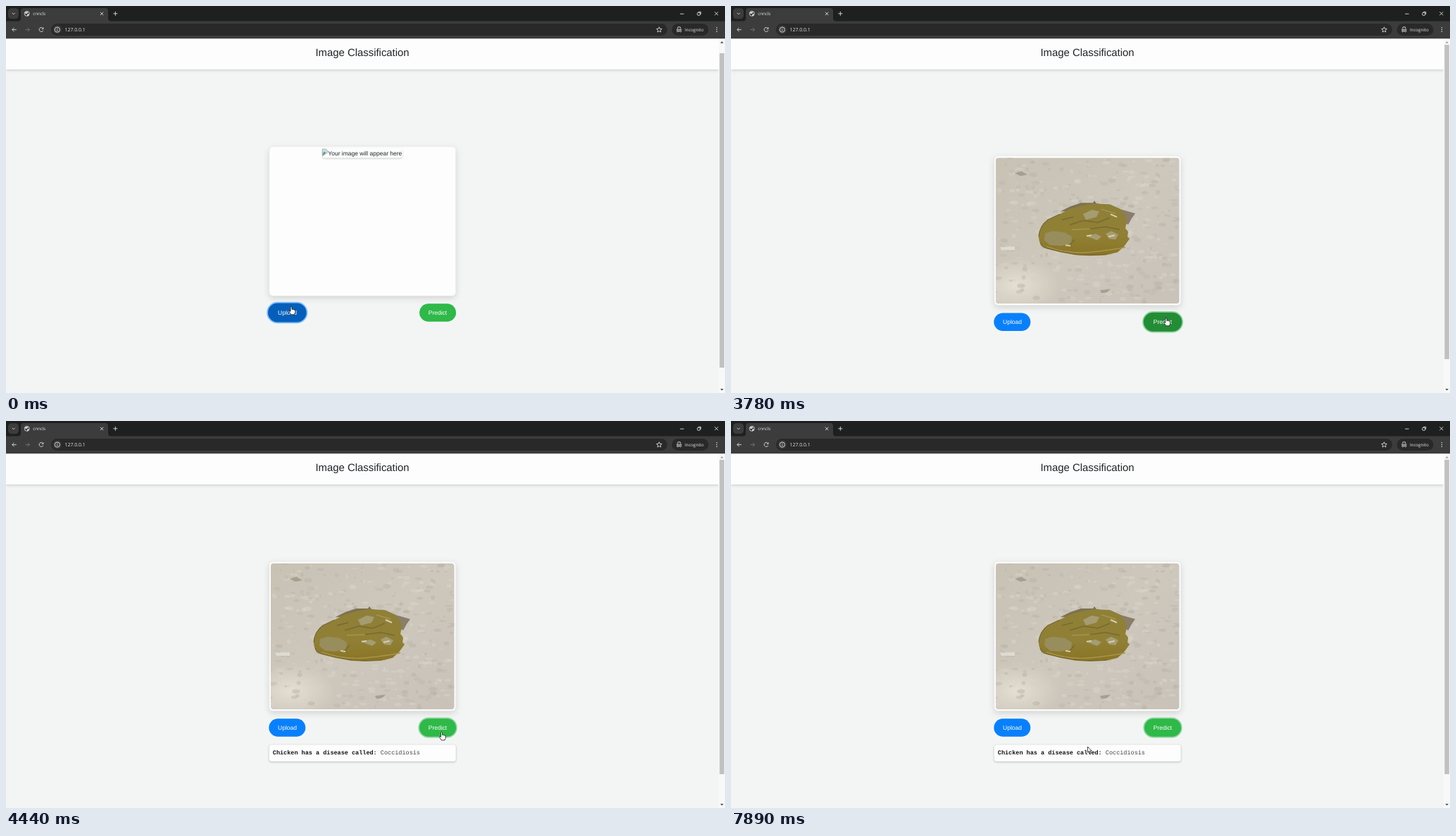
These frames come from a looping animation (1021x549 px, 8000 ms). An HTML page:

```html
<!DOCTYPE html>
<html lang="en">
<head>
<meta charset="utf-8">
<title>Image Classification</title>
<style>
  html, body { margin: 0; width: 100%; height: 100%; overflow: hidden; background: #f3f5f5; }
  svg { display: block; width: 1021px; height: 549px; }
  text { white-space: pre; text-rendering: geometricPrecision; }
  .page { font: 8.51px "Liberation Sans", Arial, sans-serif; fill: #212529; }
  .chrome { font: 6.2px "Open Sans", "Noto Sans", sans-serif; fill: #e8e8e8; }
  .mono { font: 8.51px "Liberation Mono", "Courier New", monospace; fill: #444; }
  .line { fill: none; stroke: #dedede; stroke-width: .9; }
  .mid { text-anchor: middle; }
  #bar { filter: drop-shadow(0 1px 2px rgba(0,0,0,.18)); }
  #card { filter: drop-shadow(0 3px 4px rgba(0,0,0,.13)); }
  #card.raised { filter: drop-shadow(0 5px 7px rgba(0,0,0,.25)); }
  #result rect, #alt rect { filter: drop-shadow(0 1px 1px rgba(0,0,0,.2)); }
  .button rect { transform-box: fill-box; transform-origin: center; paint-order: stroke; }
  .button text { fill: #fff; text-anchor: middle; }
  .soft { filter: blur(.7px); }
</style>
</head>
<body>
<svg viewBox="0 0 1021 549" xmlns="http://www.w3.org/2000/svg">
  <defs>
    <clipPath id="frame"><rect x="376" y="202" width="260.5" height="207" rx="4"/></clipPath>
    <linearGradient id="ground" x1="0" y1="0" x2="1" y2="1">
      <stop offset="0" stop-color="#c8c2b5"/><stop offset=".5" stop-color="#cdc7bc"/><stop offset="1" stop-color="#c8c2b9"/>
    </linearGradient>
    <radialGradient id="shine">
      <stop offset="0" stop-color="#e4dfd2"/><stop offset="1" stop-color="#e4dfd2" stop-opacity="0"/>
    </radialGradient>
    <linearGradient id="olive" x1="0" y1="0" x2="0" y2="1">
      <stop offset="0" stop-color="#8f8038"/><stop offset=".6" stop-color="#908035"/><stop offset="1" stop-color="#8a7425"/>
    </linearGradient>
  </defs>

  <rect width="1021" height="549" fill="#f3f5f5"/>
  <rect id="bar" y="40" width="1012" height="50" fill="#fdfdfd"/>
  <text class="page mid" x="506" y="70.8" style="font-size:14.9px">Image Classification</text>

  <g id="content">
    <rect id="card" x="373.8" y="199.3" width="265" height="212" rx="5.5" fill="#fdfdfd" stroke="#e2e2de" stroke-width=".6"/>
    <g id="alt">
      <rect x="449" y="202" width="114" height="13.5" rx="3" fill="#fdfdfd"/>
      <path d="M449.5 203h5l2 2v3l-7 5z" fill="#c9dcf2" stroke="#8a9199" stroke-width=".6"/>
      <path d="M449.8 212v-3l2.5-2.5 2 1.8z" fill="#58a55c"/>
      <text class="page" x="457.3" y="211.8">Your image will appear here</text>
    </g>
    <g id="photo" clip-path="url(#frame)">
      <rect x="376" y="202" width="261" height="207" fill="url(#ground)"/>
      <ellipse cx="405" cy="383" rx="62" ry="38" fill="url(#shine)"/>
      <g id="specks" class="soft"></g>
      <g class="soft">
        <path d="M403 224l9-3 9 5-10 2zM524 390l15-2-5 5-8 1z" fill="#a69f90"/>
        <path d="M382 329l21-1v5h-19z" fill="#dedbd3"/>
        <path d="M538 268l15 7 21 6-5 7-5 9-12-7z" fill="#8a7d69"/>
        <path d="M468 278l14-7 15-5 17 0 2-3 3 4 12 2-30 9z" fill="#7d7250"/>
        <path d="M437 314q1-15 13-24l17-8 13-7 18-5 17-3 22 1 16 7 7 9 2 9-2 9 4 5-1 7 3 3-8 11-9 8-16 4-23 1-20-1-22-4-20-5q-11-5-11-16z" fill="url(#olive)"/>
        <path d="M446 309l11-3 17 2 10 6-1 10-15 3-15-1-8-7z" fill="#988d5c"/>
        <path d="M500 282l12-6 11 2-4 8-15 4zM504 313l14-3 8 4-6 5zM532 310l8-4 10 5-4 7-9-1z" fill="#a59c72"/>
        <path d="M481 297l20-6 20 3 17-7M470 290l16-4M508 303l24-3 20 4M488 318l-8 9" fill="none" stroke="#776a30" stroke-width="1.6"/>
        <path d="M505 313l7-1M536 314l9-2M475 326l7 1M539 282l9 4" fill="none" stroke="#d5ceb0" stroke-width="2"/>
        <path d="M448 328q32 11 62 8t50-7M484 304l26-1M526 275l20 6" fill="none" stroke="#a8944a" stroke-width="1.4"/>
        <path d="M437 314q1-15 13-24l17-8M439 322q2 7 9 8l20 5 22 4 20 1 23-1" fill="none" stroke="#75672e" stroke-width="1.2"/>
      </g>
    </g>
    <g class="button" id="upload">
      <rect x="373.3" y="422.2" width="52" height="25.6" rx="12.8" stroke="#80bdff"/>
      <text class="page" x="399.5" y="437.7">Upload</text>
    </g>
    <g class="button" id="predict">
      <rect x="587.1" y="422.2" width="52" height="25.6" rx="12.8" stroke="#92d6a0"/>
      <text class="page" x="613" y="437.7">Predict</text>
    </g>
    <g id="result">
      <rect x="373.5" y="459" width="265.5" height="24" rx="3.5" fill="#fdfdfd" stroke="#e0e0dc" stroke-width=".6"/>
      <text class="mono" x="378.8" y="473"><tspan font-weight="bold" fill="#161616">Chicken has a disease called: </tspan>Coccidiosis</text>
    </g>
  </g>

  <g id="overlay">
    <rect y="46" width="1012" height="503" fill="#000" opacity=".5"/>
    <circle cx="506.2" cy="297.7" r="27.7" fill="none" stroke="#f3f3f1" stroke-width="8.6"/>
    <path id="arc" d="M486.6 278.1a27.7 27.7 0 0 1 39.2 0" fill="none" stroke="#0f7df2" stroke-width="8.6"/>
  </g>

  <g id="scrollbar">
    <rect x="1012" y="46" width="9" height="503" fill="#f8f8f8"/>
    <rect id="thumb" x="1013.3" y="55" width="6.6" height="446" fill="#c1c1c1"/>
    <path id="up" d="M1014.3 52.7l2.3-2.6 2.3 2.6z"/>
    <path d="M1014.3 543l2.3 2.6 2.3-2.6z" fill="#505050"/>
  </g>

  <g class="chrome">
    <rect id="strip" width="1021" height="22"/>
    <path d="M0 21.5h17q4 0 4-4V7q0-4 4-4h116q4 0 4 4v10.5q0 4 4 4h872v24.8H0z" fill="#3c3c3d"/>
    <rect x="3" y="3.3" width="15" height="15" rx="4.5" fill="#3c3c3d"/>
    <path class="line" d="M8.7 9.8l2 2 2-2M133.9 8.7l4.4 4.4m0-4.4l-4.4 4.4M152.3 10.8h6m-3-3v6"/>
    <circle cx="29.7" cy="10.8" r="3.5" class="line"/>
    <path d="M27 9l3-1 1.5 1-2 2-2.5-.5zM30 12l2.500-1-.5 2.500-2 1z" fill="#dedede"/>
    <text x="38.3" y="13">cnncls</text>
    <g id="controls" class="line">
      <path d="M957.2 11.2h5.4M1006.3 8.2l5 5m0-5l-5 5M983.2 8.3h3.5v3.5"/>
      <rect x="981.8" y="9.4" width="3.8" height="3.8" rx=".6"/>
    </g>
    <rect x="64" y="25" width="875" height="17" rx="8.5" fill="#292929"/>
    <circle cx="72.8" cy="33.6" r="6" fill="#3c3c3d"/>
    <circle cx="72.8" cy="33.6" r="3.6" class="line"/>
    <path class="line" d="M72.8 33.2v2.3m0-4.1v.9M14.8 33.6H8.9m2.6-2.7l-2.7 2.7 2.7 2.7"/>
    <path class="line" d="M27.5 33.6h5.9m-2.6-2.7l2.7 2.7-2.7 2.7" style="stroke:#777"/>
    <path class="line" d="M52.5 31.6a3 3 0 1 0 .4 3M53 30.3v2.2h-2.2"/>
    <text x="83.5" y="36.1" style="font-size:6.9px">127.0.0.1</text>
    <path class="line" d="M927.5 29.8l1.1 2.5 2.7.2-2 1.8.6 2.7-2.4-1.4-2.4 1.4.6-2.7-2-1.8 2.7-.2z"/>
    <rect x="945.5" y="25" width="52" height="17" rx="8.5" fill="#292929"/>
    <path class="line" d="M952 33.2h7.5M953.5 32l.8-2.2h3l.8 2.2M955 35.5h1.5"/>
    <circle cx="953.9" cy="35.5" r="1.2" class="line"/>
    <circle cx="957.7" cy="35.5" r="1.2" class="line"/>
    <text x="963.9" y="35.9">Incognito</text>
    <path d="M1009.3 30.7v.1m0 2.7v.1m0 2.7v.1" stroke="#e8e8e8" stroke-width="1.4" stroke-linecap="round"/>
  </g>

  <g id="cursor" fill="#fff" stroke="#161616" stroke-width=".8" stroke-linejoin="round">
    <path id="arrow" d="M0 0v8.2l1.9-1.7 1.3 3 1.4-.6-1.3-2.900h2.500z"/>
    <path id="hand" d="M-1 .9q1-1.500 2 0v3.600q1-.9 1.700.2 1-.6 1.600.4 1.300-.3 1.400 1v2.500l-1.200 3.200h-4.700l-2.800-4.300q0-1.300 1-1l1 .9z"/>
  </g>
</svg>

<script>
const LOOP = 8000, TICKS = 72, FADE = 3;
const $ = id => document.getElementById(id);
const show = (id, on) => { $(id).style.display = on ? "" : "none"; };
const within = (n, spans) => spans.some(([from, to]) => n >= from && n < to);
const clamp = v => Math.max(0, Math.min(1, v));

// All times are in ticks of LOOP / TICKS ms.
const uploadHover = [[-FADE, 2], [50, 61]];
const predictHover = [[28, 35], [40, 42]];
const loading = [[35, 40]];

// tick, x, y of the cursor tip
const path = [
  [0, 405, 426], [2, 405, 426], [8, 470, 330], [14, 430, 400], [23, 430, 400],
  [24, 430, 510], [25, 440, 500], [28, 592, 450], [31, 616, 442], [33, 616, 442],
  [34, 618, 442], [35, 615, 441], [40, 618.5, 441], [41, 617, 444], [45, 575, 476],
  [48, 510, 460], [50, 415, 442], [53, 382, 438], [58, 382, 438], [59, 379.5, 436],
  [63, 440, 534], [66, 495, 470], [67, 505, 458], [71, 506.5, 462]
];

function cursorAt(n) {
  const i = path.findIndex(key => key[0] >= n);
  if (i <= 0) return path[0].slice(1);
  const [a, x0, y0] = path[i - 1], [b, x1, y1] = path[i];
  const k = (n - a) / (b - a);
  return [x0 + (x1 - x0) * k, y0 + (y1 - y0) * k];
}

// Fades in after each span begins and out after it ends.
function hoverLevel(n, spans) {
  return Math.max(...spans.map(([from, to]) =>
    clamp((Math.min(n, to) - from) / FADE) * clamp(1 - (n - to) / FADE)));
}

function scatterSpecks() {
  let seed = 7;
  const random = () => (seed = seed * 16807 % 2147483647) / 2147483647;
  const tones = ["#b9b2a5", "#dad5ca", "#beb7ac", "#d7d1c6"];
  let marks = "";
  for (let i = 0; i < 420; i++) {
    const x = 376 + random() * 261, y = 202 + random() * 207;
    const rx = 1 + random() * 5, ry = .7 + random() * 2.5;
    marks += `<ellipse cx="${x}" cy="${y}" rx="${rx}" ry="${ry}" fill="${tones[i % 4]}" opacity=".5"/>`;
  }
  $("specks").innerHTML = marks;
}

function styleButton(id, color, hoverColor, level, focus) {
  const style = $(id).querySelector("rect").style;
  style.fill = `color-mix(in srgb, ${hoverColor} ${level * 100}%, ${color})`;
  style.transform = `scale(${1 + level * .05})`;
  style.strokeWidth = focus ? 3.4 : 0;
}

function render(n) {
  const scrolled = n < 4;
  const answered = n >= 40;
  const loaded = n >= 26;
  const inactive = n >= 2 && n < 25;
  const busy = within(n, loading);

  $("content").setAttribute("transform", `translate(0 ${scrolled || answered ? 0 : 13.3})`);
  $("thumb").setAttribute("y", scrolled ? 67 : 55);
  $("up").setAttribute("fill", scrolled ? "#505050" : "#a3a3a3");
  $("strip").setAttribute("fill", inactive ? "#2a2a2b" : "#1e1f1f");
  $("controls").style.opacity = inactive ? .45 : 1;
  $("card").classList.toggle("raised", n >= 4 && n < 25);

  show("alt", !loaded);
  show("photo", loaded);
  show("result", answered);
  styleButton("upload", "#0880fc", "#055fba", hoverLevel(n, uploadHover), n < 2);
  styleButton("predict", "#2eb948", "#238d35", hoverLevel(n, predictHover), n >= 33);

  show("overlay", busy);
  const angle = 7 + (n - 35) * LOOP / TICKS * .18;
  $("arc").setAttribute("transform", `rotate(${angle} 506.2 297.7)`);

  const hand = within(n, [...uploadHover, ...predictHover]);
  show("hand", hand);
  show("arrow", !hand);
  $("cursor").setAttribute("transform", `translate(${cursorAt(n)})`);
}

scatterSpecks();
const start = performance.now();
let last = -1;
function tick() {
  const ms = (performance.now() - start) % LOOP;
  const n = Math.floor((ms + 6) / LOOP * TICKS) % TICKS;
  if (n !== last) render(last = n);
  requestAnimationFrame(tick);
}
tick();
</script>
</body>
</html>
```
